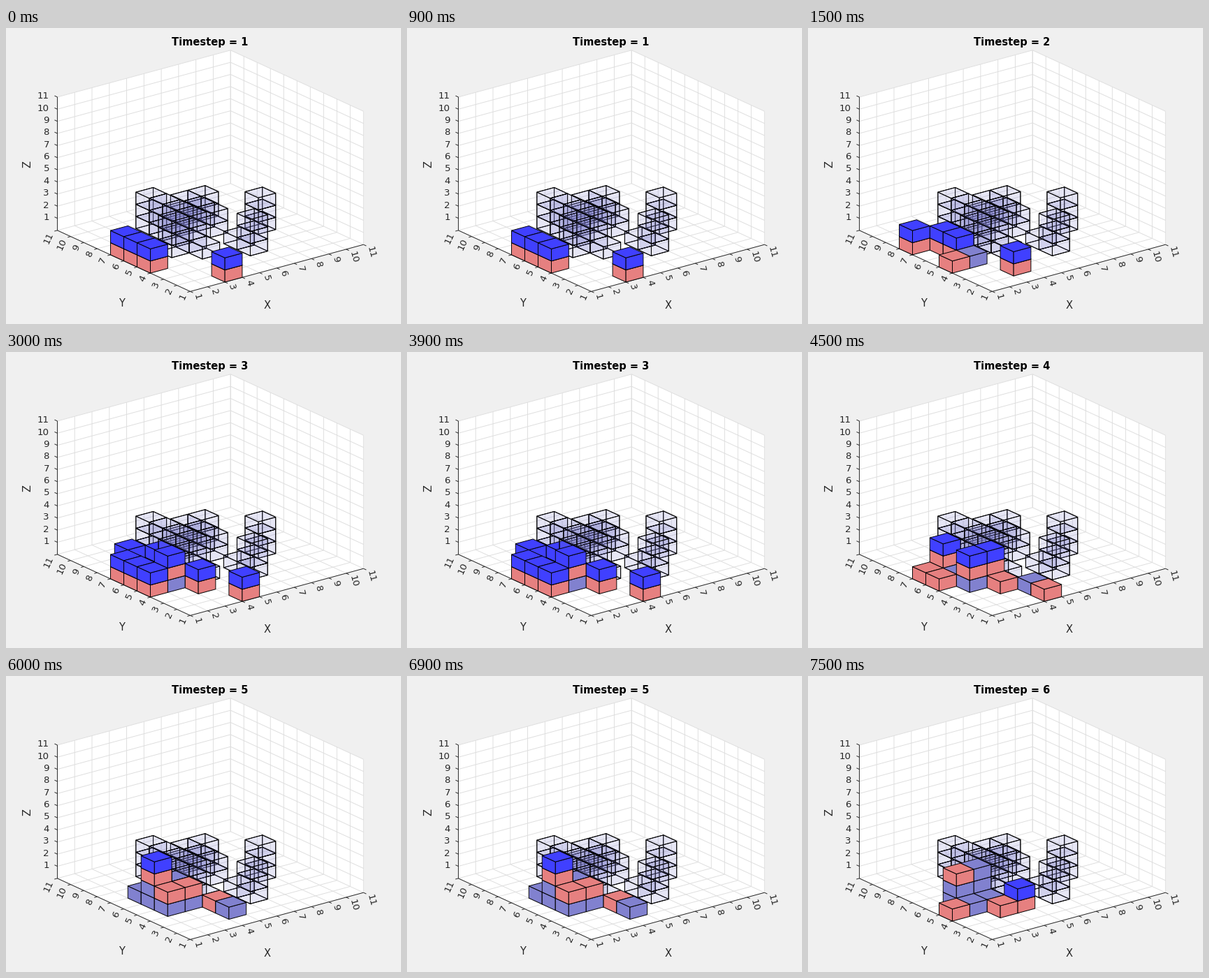
Animation, 565 px wide and 424 px high, one loop 8000 ms. Source, as a matplotlib script:

```python
import numpy as np
import matplotlib.pyplot as plt
from matplotlib.animation import FuncAnimation
from matplotlib.collections import LineCollection, PolyCollection

W, H, DPI = 565, 424, 100
PX = 72 / DPI                      # one pixel in points
DARK = (0.15, 0.15, 0.15)
BLUE = (0.25, 0.25, 1.0, 1)
RED = (0.902, 0.502, 0.502, 1)
SLATE = (0.506, 0.506, 0.812, 1)
GHOST = SLATE[:3] + (0.1,)

# Orthographic view stretched to fill the plot box
AZ, EL = np.radians(37.5), np.radians(30)
LEFT, BOTTOM = 0.13 * W, 0.89 * H
SX = 0.775 * W / (np.cos(AZ) + np.sin(AZ))
SY = 0.815 * H / ((np.cos(AZ) + np.sin(AZ)) * np.sin(EL) + np.cos(EL))


def project(x, y, z):
    u, v, w = (x - 1) / 10, (y - 1) / 10, z / 11
    px = LEFT + SX * (u * np.cos(AZ) + (1 - v) * np.sin(AZ))
    depth = u * np.sin(AZ) + v * np.cos(AZ)
    return px, BOTTOM - SY * (depth * np.sin(EL) + w * np.cos(EL))


def stack(x, y, height):
    return [(x, y, z) for z in range(height)]


GOAL = sum((stack(*s) for s in [
    (4, 8, 3), (4, 7, 3), (4, 6, 3), (4, 5, 3), (4, 4, 1), (3, 5, 3),
    (5, 7, 2), (6, 8, 2), (7, 8, 2), (6, 7, 2), (6, 6, 2),
    (8, 5, 3), (6, 3, 3), (6, 4, 1)]), [])

# Each step: loaded robots, empty robots, placed blocks
STEPS = [
    ([(1, 4, 0), (1, 5, 0), (1, 6, 0), (3, 1, 0)], [], []),
    ([(1, 7, 0), (2, 6, 0), (2, 5, 0), (3, 2, 0)], [(1, 4, 0)], [(2, 4, 0)]),
    ([(1, 4, 0), (1, 5, 0), (1, 6, 0), (2, 7, 0), (3, 6, 0), (2, 4, 1),
      (3, 3, 0), (4, 1, 0)], [], [(2, 4, 0)]),
    ([(2, 6, 1), (2, 4, 1), (3, 4, 1)],
     [(1, 5, 0), (1, 6, 0), (3, 3, 0), (4, 1, 0)],
     [(2, 4, 0), (2, 5, 0), (2, 6, 0), (3, 4, 0), (3, 5, 0), (4, 2, 0)]),
    ([(2, 5, 2)], [(2, 4, 1), (3, 4, 1), (4, 3, 0)],
     stack(2, 5, 2) + stack(3, 5, 2)
     + [(2, 4, 0), (2, 6, 0), (3, 4, 0), (4, 2, 0)]),
    ([(4, 3, 0)], [(2, 5, 2), (1, 4, 0), (3, 3, 0)],
     stack(2, 5, 2) + stack(3, 5, 3) + [(2, 4, 0), (3, 4, 0)]),
]

# Unit cube faces, the three far ones first
SQUARE = [(0, 0), (1, 0), (1, 1), (0, 1)]
FACES = ([[(p, q, 0) for p, q in SQUARE], [(p, 1, q) for p, q in SQUARE],
          [(1, p, q) for p, q in SQUARE], [(0, p, q) for p, q in SQUARE],
          [(p, 0, q) for p, q in SQUARE], [(p, q, 1) for p, q in SQUARE]])


def scene(step):
    """Polygons and colours of one step, far to near."""
    loaded, empty, placed = STEPS[step]
    cells = dict.fromkeys(GOAL, GHOST)
    cells.update(dict.fromkeys(placed, SLATE))
    cells.update(dict.fromkeys(empty + loaded, RED))
    cells.update({(x, y, z + 1): BLUE for x, y, z in loaded})
    polys, colors = [], []
    for x, y, z in sorted(cells, key=lambda c: (-c[0], -c[1], c[2])):
        color = cells[x, y, z]
        for face in FACES if color == GHOST else FACES[3:]:
            polys.append([project(x + i, y + j, z + k) for i, j, k in face])
            colors.append(color)
    return polys, colors


fig = plt.figure(figsize=(W / DPI, H / DPI), dpi=DPI, facecolor=(0.94,) * 3)
plt.rcParams["font.family"] = "DejaVu Sans"
ax = fig.add_axes([0, 0, 1, 1])
ax.set_xlim(0, W)
ax.set_ylim(H, 0)
ax.axis("off")


def lines(segments, color, order):
    pts = [[project(*p) for p in seg] for seg in segments]
    ax.add_collection(LineCollection(pts, colors=[color], linewidths=0.95 * PX,
                                     zorder=order))


def label(x, y, text, size, angle=0, ha="center"):
    """Put the middle of the capital height at (x, y)."""
    drop = 0.365 * size
    t = np.radians(angle)
    ax.text(x + drop * np.sin(t), y + drop * np.cos(t), text, color=DARK,
            fontsize=size * PX, rotation=angle, rotation_mode="anchor",
            ha=ha, va="baseline")


# Floor and the two back walls
for corners in ([(1, 1, 0), (11, 1, 0), (11, 11, 0), (1, 11, 0)],
                [(1, 11, 0), (11, 11, 0), (11, 11, 11), (1, 11, 11)],
                [(11, 1, 0), (11, 11, 0), (11, 11, 11), (11, 1, 11)]):
    ax.add_patch(plt.Polygon([project(*c) for c in corners], fc="white",
                             ec="white", lw=0.3, zorder=1))

grid = []
for n in range(1, 12):
    grid += [[(n, 1, 0), (n, 11, 0), (n, 11, 11)],
             [(1, n, 0), (11, n, 0), (11, n, 11)],
             [(1, 11, n), (11, 11, n), (11, 1, n)]]
lines(grid, (0.87, 0.87, 0.87), 2)
lines([[(11, 1, 0), (1, 1, 0), (1, 11, 0), (1, 11, 11)]], DARK, 3)

ticks = []
for n in range(1, 12):
    ticks += [[(n, 1, 0), (n, 0.79, 0)], [(1, n, 0), (0.83, n, 0)],
              [(1, 11, n), (1, 11.21, n)]]
    far = n > 9
    x, y = project(n, 1, 0)
    label(x + 10.8 + far, y + 7.3 + 3.6 * far, str(n), 13.33, -74.8)
    x, y = project(1, n, 0)
    label(x - 12 - 1.8 * far, y + 7 + 3.6 * far, str(n), 13.33, 65.3)
    x, y = project(1, 11, n)
    label(62, y - 2.5, str(n), 13.33, ha="right")
lines(ticks, DARK, 3)

label(374, 397, "X", 14.67)
label(165, 394, "Y", 14.67)
label(30, 195, "Z", 14.67, 90)

title = ax.text(291.8, 25, "", fontsize=14.67 * PX, weight="bold",
                color="black", ha="center", va="baseline")
cubes = PolyCollection([], edgecolors="black", linewidths=0.95 * PX, zorder=5)
ax.add_collection(cubes)


def draw(frame):
    step = frame // 3
    polys, colors = scene(step)
    cubes.set_verts(polys)
    cubes.set_facecolor(colors)
    title.set_text(f"Timestep = {step + 1}")
    return cubes, title


anim = FuncAnimation(fig, draw, frames=16, interval=500, repeat=True,
                     repeat_delay=0, blit=False)
plt.show()
```
